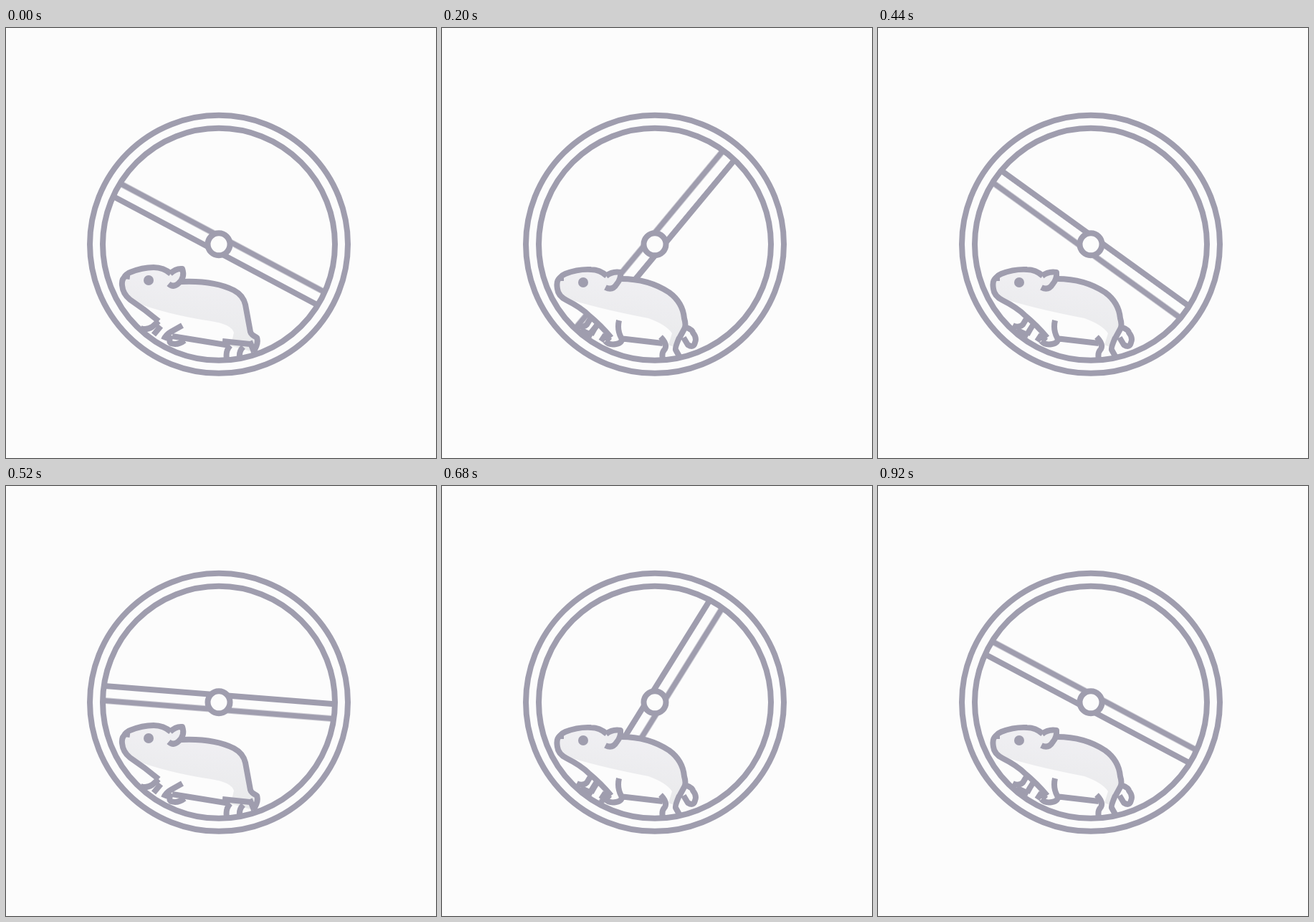
An HTML page for the animation above (960 ms loop, 600 by 600 pixels).

```html
<!DOCTYPE html>
<html lang="en">
<head>
<meta charset="utf-8">
<title>Hamster wheel</title>
<style>
  html, body { margin: 0; width: 100%; height: 100%; overflow: hidden; background: #fcfcfc; }
  svg { display: block; width: 100vw; height: 100vh; }
  .line { fill: none; stroke: #9f9dae; stroke-width: 8; stroke-linejoin: round; }
  .paper { fill: #fcfcfc; }
  .fur { fill: url(#fur); }
  .eye { fill: #9f9dae; }
  /* 23 of the 24 steps make one full turn */
  #bar { transform-origin: 297px 301.8px; animation: turn 960ms steps(24) infinite; }
  .pose { animation: show 240ms step-end infinite; }
  @keyframes turn { from { transform: rotate(28deg); } to { transform: rotate(-347.652deg); } }
  @keyframes show { 0% { opacity: 1; } 33.333%, 100% { opacity: 0; } }
</style>
</head>
<body>
<svg viewBox="0 0 600 600">
  <defs>
    <linearGradient id="fur" gradientUnits="userSpaceOnUse" x1="250" y1="335" x2="232" y2="440">
      <stop offset="0" stop-color="#f1f0f4"/>
      <stop offset="1" stop-color="#e8e9ea"/>
    </linearGradient>
  </defs>
  <g id="bar" class="line"><path d="M137 291.6H457M137 312H457"/></g>
  <circle class="line" style="fill:#fcfcfc" cx="297" cy="301.8" r="15.5"/>
  <g id="hamster"></g>
  <g class="line">
    <circle cx="297" cy="301.8" r="180"/>
    <circle cx="297" cy="301.8" r="162"/>
  </g>
</svg>
<script>
const poses = [
  { // stretched
    eye: [199, 352],
    head: 'M173 347L166 346Q170 342 173 341Q190 334 206 334Q220 334 230 343',
    ear: 'M229 343Q237 335 246 336Q250 348 241 356Q234 363 227 357',
    back: 'M244 354Q290 352 318 366Q331 373 334 386L341 424Q342 428 350 432Q353 440 345 452',
    chin: 'M167 346Q161 350 162 359Q163 371 173 379Q194 393 213 409',
    belly: 'L232 430L312 443L345 452',
    legs: 'M213 409L204 417Q196 422 188 419M216 416L206 428M246 415L230 424Q223 428 220 435' +
      'M231 429Q226 436 230 440Q240 443 249 436M232 430L312 443M302 437L340 441' +
      'M313 443Q306 450 308 462M331 445Q325 451 326 459M340 437L346 452',
    shade: 'M150 325H365V460H310L318 425Q314 413 286 409Q225 400 175 381L150 380Z'
  },
  { // pushing off
    eye: [204, 355.5],
    head: 'M178 348L171 349Q175 346 178 345Q193 338 210 338Q224 338 234 346',
    ear: 'M233 346Q242 339 251 340Q253 351 246 358Q239 366 231 360',
    back: 'M249 355Q285 355 314 368Q340 380 343 398Q350 424 347 440L346 455',
    chin: 'M171 349Q166 353 167 362Q168 373 178 382Q200 397 222 414',
    belly: 'L241 431L320 443L346 455',
    legs: 'M222 414L221 425L208 433M210 434L218 441M254 416L240 423L231 436L229 446M221 439L232 443' +
      'M241 431Q278 440 320 443M308 436L332 446M325 443Q320 449 327 458M332 445L335 456',
    shade: 'M150 325H365V460H334L325 432Q318 419 290 411Q230 399 182 382L150 381Z'
  },
  { // gathered
    eye: [197, 355],
    head: 'M170 349L164 349Q167 345 172 343Q190 336 208 337Q220 337 230 346',
    ear: 'M229 346Q238 339 249 341Q250 350 244 357Q238 367 228 362',
    back: 'M246 350Q287 349 317 369Q336 383 338 405Q341 415 338 420L331 433',
    chin: 'M164 349Q159 353 161 364Q162 374 174 380Q194 390 205 401Q222 415 236 432',
    belly: 'L250 433L308 440L328 446L331 433',
    legs: 'M208 404L202 414Q196 419 188 415M217 413L212 421L208 428M193 421L210 429M228 428L222 437' +
      'M247 408Q244 421 250 432Q253 439 243 441Q233 443 228 437M234 431L229 437M248 433L308 440' +
      'M305 431Q315 441 311 448Q306 453 308 462M331 432Q325 446 326 449L331 458' +
      'M339 417Q350 421 350 425Q356 432 353 439Q351 447 343 442L337 432',
    shade: 'M150 325H365V436L331 433L326 462H310L321 426Q313 414 288 405Q215 391 166 375L150 375Z'
  }
];

const pathTag = (cls, d, extra = '') => `<path class="${cls}" d="${d}" ${extra}/>`;

// Joins the back to the belly and chin so the coat can be clipped to the body.
function bodyPath(p) {
  return `${p.chin}${p.belly}L${p.back.slice(1)}Z`;
}

function drawPose(p, i) {
  const [x, y] = p.eye;
  const outline = p.chin + p.belly + 'L' + p.backEnd;
  return `<g class="pose" style="animation-delay:${i ? i * 80 - 240 : 0}ms">
    <clipPath id="body${i}"><path d="${p.body}"/></clipPath>
    ${pathTag('paper', p.body)}
    ${pathTag('fur', p.shade, `clip-path="url(#body${i})"`)}
    ${pathTag('line', p.head + p.back + p.chin + p.legs)}
    ${pathTag('line', p.ear, 'style="fill:#eeeef1"')}
    <circle class="eye" cx="${x}" cy="${y}" r="7"/>
  </g>`;
}

// Reverses a path of M, L and Q commands.
function reverse(d) {
  const parts = d.match(/[MLQ][^MLQ]*/g).map(s => [s[0], s.slice(1).trim().split(/\s+/)]);
  let out = '';
  for (let i = parts.length - 1; i > 0; i--) {
    const [cmd, nums] = parts[i];
    const end = parts[i - 1][1].slice(-2).join(' ');
    out += cmd === 'Q' ? `Q${nums[0]} ${nums[1]} ${end}` : `L${end}`;
  }
  return out;
}

for (const p of poses) {
  const tail = p.back.match(/(\S+) (\S+)$/)[0].replace(/^.*[MLQ]/, '');
  p.body = `${p.chin}${p.belly}L${tail}${reverse(p.back)}L${p.head.match(/\d+ \d+$/)[0]}${reverse(p.head)}Z`;
}
document.getElementById('hamster').innerHTML = poses.map(drawPose).join('');
</script>
</body>
</html>
```
